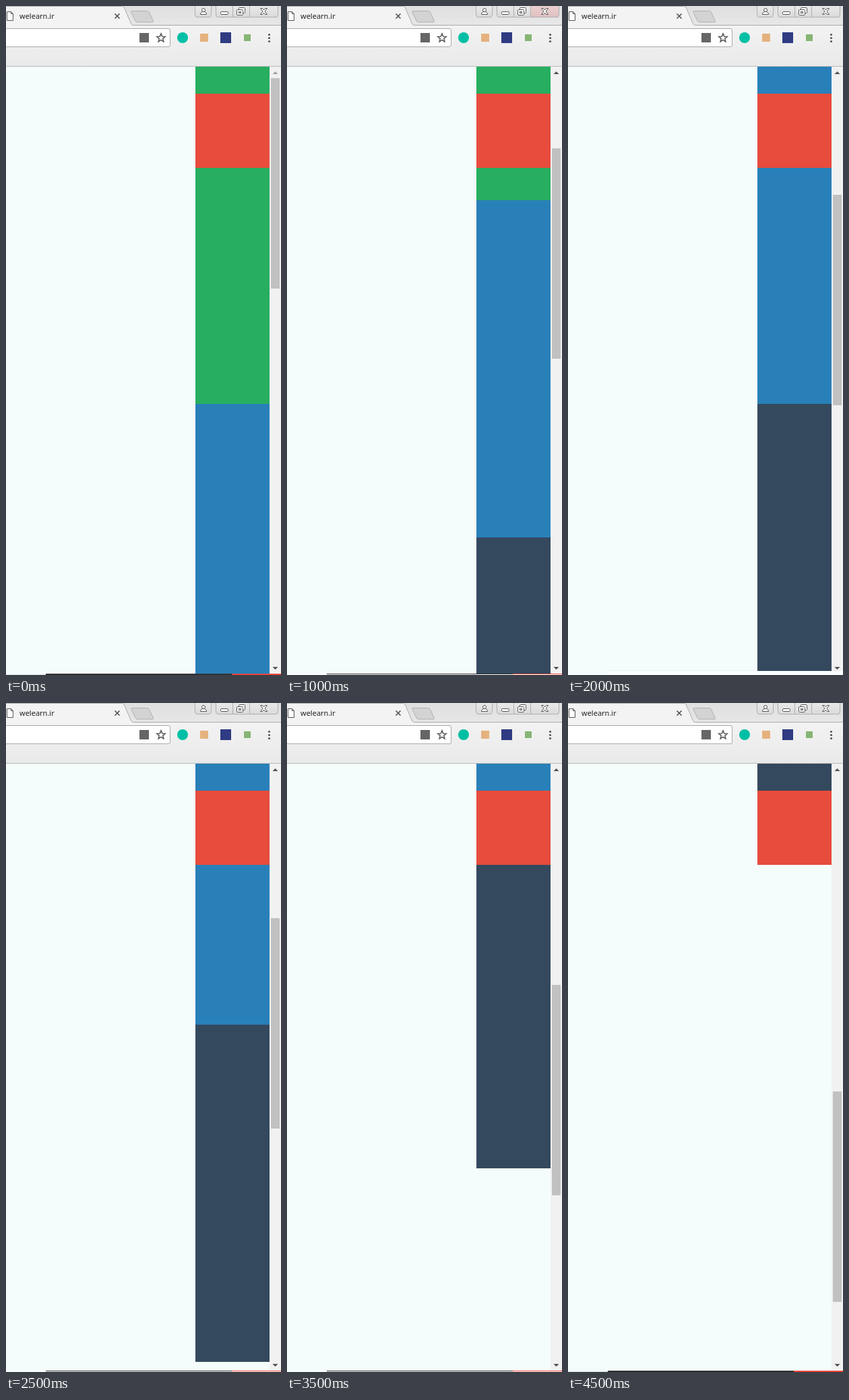
These frames come from a looping animation (408 by 992 pixels, 5000 ms). An HTML page:

```html
<!DOCTYPE html>
<html lang="en">
<head>
<meta charset="utf-8">
<title>Sticky box</title>
<style>
html, body { margin: 0; width: 100%; height: 100%; overflow: hidden; background: #f5fcfc; }
svg { display: block; width: 100vw; height: 100vh; }
</style>
</head>
<body>
<svg viewBox="0 0 408 992" preserveAspectRatio="none">
  <defs>
    <linearGradient id="bar" x2="0" y2="1"><stop stop-color="#f3f3f3"/><stop offset="1" stop-color="#e9e9e9"/></linearGradient>
    <linearGradient id="title" x2="0" y2="1"><stop stop-color="#dfdfdf"/><stop offset="1" stop-color="#e7e7e7"/></linearGradient>
    <linearGradient id="btn" x2="0" y2="1"><stop stop-color="#e9e9e9"/><stop offset="1" stop-color="#dadada"/></linearGradient>
    <linearGradient id="hot" x2="0" y2="1"><stop stop-color="#ead0cf"/><stop offset="1" stop-color="#dfc0bf"/></linearGradient>
  </defs>

  <!-- page -->
  <rect width="408" height="992" fill="#f5fcfc"/>
  <g id="blocks">
    <rect x="281" width="110" height="500" fill="#27ae60"/>
    <rect x="281" y="500" width="110" height="500" fill="#2980b9"/>
    <rect x="281" y="1000" width="110" height="500" fill="#34495e"/>
  </g>
  <rect x="281" y="130" width="110" height="110" fill="#e74c3c"/>

  <!-- scrollbar -->
  <rect x="391" y="90" width="17" height="902" fill="#f1f1f1"/>
  <rect id="thumb" x="393" width="13" height="312" fill="#c1c1c1"/>
  <path id="up" d="M395.5 101h8l-4-4z"/>
  <path d="M395.5 980h8l-4 4z" fill="#505050"/>

  <!-- bottom edge -->
  <g id="strip">
    <rect id="edge" y="991" width="408" height="1"/>
    <rect class="line" x="59" y="990" width="276" fill="#333"/>
    <rect class="line" x="335" y="990" width="73" fill="#f0463a"/>
  </g>
  <g id="panel">
    <rect x="59" y="985" width="222" height="1" fill="#edf2f2"/>
    <rect x="59" y="986" width="349" height="6" fill="#fafdfd"/>
  </g>

  <!-- browser frame -->
  <rect width="408" height="29" fill="url(#title)"/>
  <rect y="28" width="408" height="62" fill="url(#bar)"/>
  <path d="M0 28V1h173q2 0 3 2l10 24q1 1 3 1v1H0z" fill="#f3f3f3"/>
  <path d="M0 .5h172.500q2 0 3 2.500l10 23q1 2.500 3.500 2.500H408" fill="none" stroke="#a9a9a9"/>
  <path d="M186.500 7.500h23q2 0 3 2l6 13q.5 1.500-1.500 1.500h-22q-2 0-3-2l-6-12.500q-1-2 .5-2z" fill="#d3d3d3" stroke="#b0b0b0"/>
  <path d="M1.500 8.500h6l3 3v10h-9zM7.500 8.500v3h3" fill="#fff" stroke="#555"/>
  <text x="20" y="19" font-family="'Noto Sans', 'Open Sans', sans-serif" font-size="11" fill="#222">welearn.ir</text>
  <path d="M161.500 11.500l7 7m0-7l-7 7" stroke="#555" stroke-width="1.700"/>

  <g stroke="#b0b0b0">
    <path d="M280.500 0v13q0 3.500 3.500 3.500h17q3.500 0 3.500-3.500V0" fill="url(#btn)"/>
    <path d="M311.500 0v13q0 3.500 3.500 3.500h85q3.500 0 3.500-3.500V0" fill="url(#btn)"/>
    <path id="close" d="M361.500 0v16.500h38.500q3.500 0 3.500-3.500V0"/>
    <path d="M336.500 0v16.500" fill="none"/>
  </g>
  <g fill="#fff" stroke="#555">
    <path d="M288.500 12.500q0-4 4.500-4t4.500 4z"/>
    <circle cx="293" cy="6" r="2.500"/>
    <rect x="318.500" y="8.500" width="11" height="4" rx="1.200"/>
    <rect x="345.500" y="2.500" width="9" height="8" rx="1"/>
    <rect x="342.500" y="5.500" width="9" height="8" rx="1"/>
    <rect x="345.500" y="8.500" width="3" height="2"/>
    <path d="M377.500 3.500h3l2 2.500 2-2.500h3l-3.500 4.500 3.500 4.500h-3l-2-2.500-2 2.500h-3l3.500-4.500z"/>
  </g>

  <path d="M0 33.500h241q2.500 0 2.500 2.500v22q0 2.500-2.500 2.500H0" fill="#fff" stroke="#a9a9a9"/>
  <rect x="198" y="40" width="14" height="14" fill="#666"/>
  <path id="star" fill="none" stroke="#555" stroke-width="1.500"/>
  <circle cx="262" cy="47" r="8" fill="#00bfa5"/>
  <rect x="288" y="41" width="12" height="12" fill="#e5b27e"/>
  <rect x="318" y="39" width="16" height="16" fill="#2f3b82"/>
  <rect x="353" y="42" width="10" height="10" fill="#86b573"/>
  <g fill="#555">
    <circle cx="390.500" cy="42.500" r="1.600"/><circle cx="390.500" cy="47.500" r="1.600"/><circle cx="390.500" cy="52.500" r="1.600"/>
  </g>
  <rect y="89" width="408" height="1" fill="#b9b9b9"/>
</svg>
<script>
const STEP = 500;
const scrolls = [0, 132, 302, 420, 500, 613, 789, 900, 999, 1355];
const $ = id => document.getElementById(id);
const set = (el, name, value) => el.setAttribute(name, value);
const show = (el, on) => set(el, 'visibility', on ? 'visible' : 'hidden');
const lines = document.querySelectorAll('.line');

const points = Array.from({ length: 10 }, (_, i) => {
  const a = i * Math.PI / 5, r = i % 2 ? 2.9 : 6.6;
  return `${230 + r * Math.sin(a)} ${47.5 - r * Math.cos(a)}`;
});
set($('star'), 'd', `M${points.join('L')}z`);

function draw(time) {
  const i = Math.floor(time / STEP) % scrolls.length;
  const y = scrolls[i];
  const thick = [0, 6, 9].includes(i);
  const covered = i === 3 || i === 4;
  set($('blocks'), 'transform', `translate(0 ${90 - y})`);
  set($('thumb'), 'y', 107 + Math.round(y * 0.346));
  set($('up'), 'fill', y ? '#505050' : '#a3a3a3');
  set($('close'), 'fill', i === 2 ? 'url(#hot)' : 'url(#btn)');
  set($('edge'), 'fill', thick ? '#d5dada' : '#fff');
  lines.forEach(line => set(line, 'height', thick ? 2 : 1));
  show($('strip'), !covered);
  show($('panel'), covered);
}

const start = performance.now();
function tick() {
  draw(performance.now() - start);
  requestAnimationFrame(tick);
}
tick();
</script>
</body>
</html>
```
